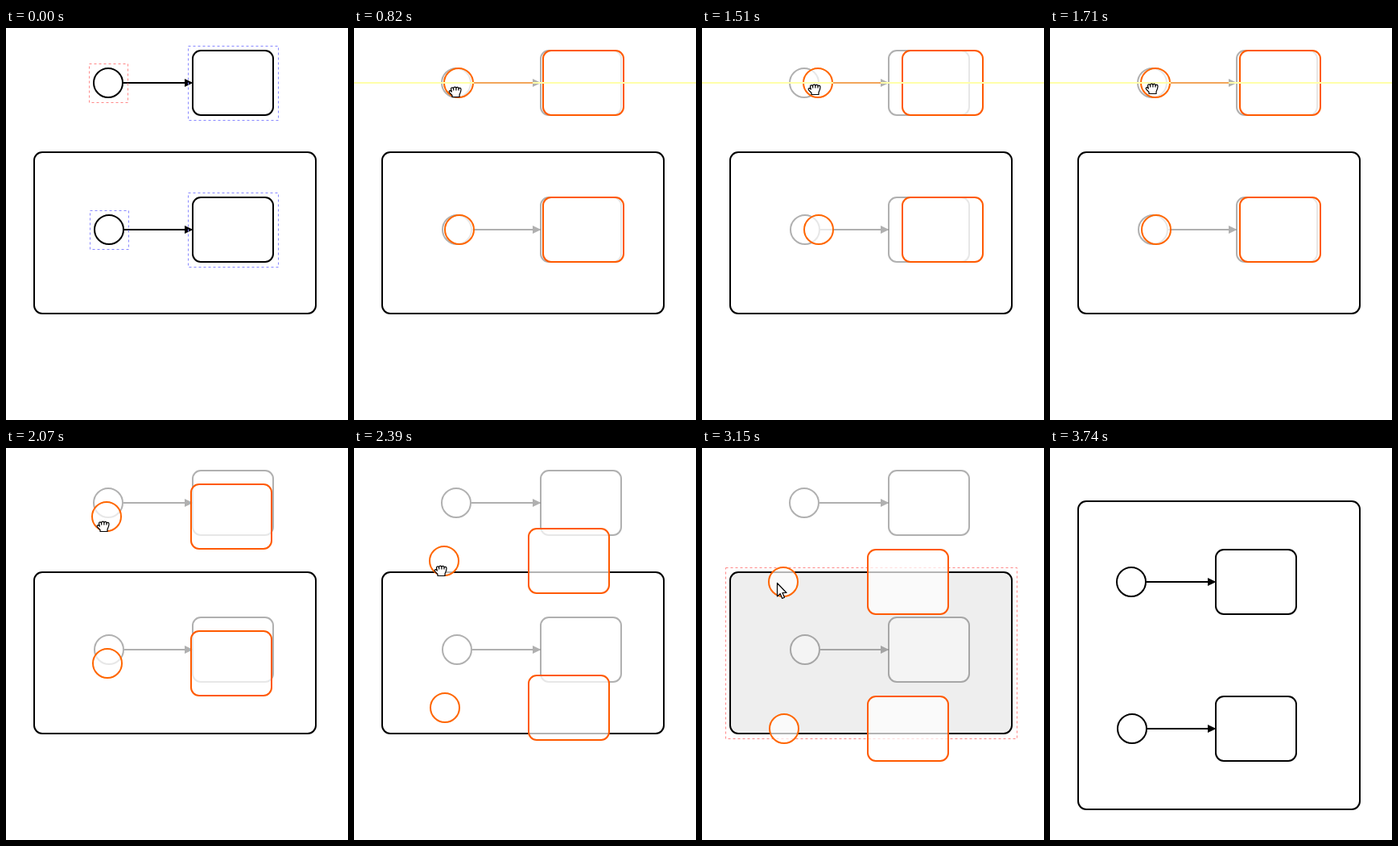
These frames come from a looping animation (425x486 px, 4.82 s). An HTML page with a canvas:

```html
<!DOCTYPE html>
<html lang="en">
<head>
<meta charset="utf-8">
<title>Dragging shapes into a container</title>
<style>
  html, body { margin: 0; width: 100%; height: 100%; overflow: hidden; background: #fff; }
  canvas { display: block; }
</style>
</head>
<body>
<canvas id="stage" width="425" height="486"></canvas>
<script>
const ctx = document.getElementById('stage').getContext('2d');
const LOOP = 4820, STEP = 40, SNAP = 7;
const DRAG = 820, BACK = 1390, ENTER = 2430, RELEASE = 3150, DROP = 3190, LEAVE = 3480, DESELECT = 3740;
const BLUE = '#8888ff', RED = '#ff8888', ORANGE = '#ff5a00';

// Pointer offset from the grab point: [time, x, y]
const pointer = [
  [780, 0, -1], [1100, 27, -4], [1350, 27, -4], [1710, 4, -5], [1870, 2, -5],
  [1910, 2, -5], [2070, -2, 17], [2390, -15, 72], [2470, -19, 82], [2670, -26, 98]
];
const exitPath = [[3190, 93, 167], [3470, 402, 300]];

const circles = [[127, 68], [128, 250]];
const boxes = [[232, 28], [232, 210]];

const hand = new Path2D('M-3.5 6.5V4.5L-7 .8C-8-.8-6.5-2-5-.8L-4.2 0-5-3.5C-5-5.5-2.6-5.6-2-4C-1.8-6.5 1.2-6.5 1.4-4.5C2-6.3 4.4-6 4.5-4C5.2-5.2 7.5-4.8 7.5-2.8C7.5 0 6.5 2 5.5 4V6.5Z');
const fingers = new Path2D('M-1.8-4V-1.5M1.4-4.5V-1.5M4.5-4V-1.5');
const arrow = new Path2D('M.5 .5V17L4.2 13.6 6.7 19.5 9.5 18.2 7 12.5H12Z');

function along(path, t) {
  if (t <= path[0][0]) return path[0].slice(1);
  for (let i = 1; i < path.length; i++) {
    const [t0, x0, y0] = path[i - 1], [t1, x1, y1] = path[i];
    if (t < t1) {
      const k = (t - t0) / (t1 - t0);
      return [Math.round(x0 + (x1 - x0) * k), Math.round(y0 + (y1 - y0) * k)];
    }
  }
  return path[path.length - 1].slice(1);
}

function paint(fill, stroke, fillAlpha = 1) {
  const alpha = ctx.globalAlpha;
  ctx.globalAlpha = alpha * fillAlpha;
  ctx.fillStyle = fill;
  ctx.fill();
  ctx.globalAlpha = alpha;
  ctx.strokeStyle = stroke;
  ctx.lineWidth = 2;
  ctx.stroke();
}

function circle(x, y, ...style) {
  ctx.beginPath();
  ctx.arc(x, y, 18, 0, Math.PI * 2);
  paint(...style);
}

function box(x, y, w, h, ...style) {
  ctx.beginPath();
  ctx.roundRect(x, y, w, h, 10);
  paint(...style);
}

function outline(x, y, w, h, color) {
  ctx.save();
  ctx.setLineDash([3, 3]);
  ctx.strokeStyle = color;
  ctx.lineWidth = 1;
  ctx.strokeRect(x - 5.5, y - 5.5, w + 12, h + 12);
  ctx.restore();
}

function flow(x0, x1, y) {
  ctx.fillStyle = '#000';
  ctx.fillRect(x0, y - 1, x1 - 10 - x0, 2);
  ctx.beginPath();
  ctx.moveTo(x1 - 10, y - 5);
  ctx.lineTo(x1 + .5, y);
  ctx.lineTo(x1 - 10, y + 5);
  ctx.fill();
}

function shapes(dx, dy, alpha) {
  ctx.globalAlpha = alpha;
  circles.forEach(([cx, cy], i) => {
    const [bx, by] = boxes[i];
    flow(cx + dx + 19, bx + dx, cy + dy);
    circle(cx + dx, cy + dy, '#fff', '#000');
    box(bx + dx, by + dy, 100, 80, '#fff', '#000');
  });
  ctx.globalAlpha = 1;
}

function ghosts(dx, dy) {
  circles.forEach(([x, y]) => circle(x + dx, y + dy, '#fff', '#ff6600', .7));
  boxes.forEach(([x, y]) => box(x + dx, y + dy, 100, 80, '#fff', ORANGE, .7));
}

function selection(dx, dy, hovered) {
  circles.forEach(([x, y], i) =>
    outline(x + dx - 18, y + dy - 18, 36, 36, hovered && !i ? RED : BLUE));
  boxes.forEach(([x, y]) => outline(x + dx, y + dy, 100, 80, BLUE));
}

function guide(dx) {
  ctx.fillStyle = '#ffffaa';
  ctx.fillRect(0, 67, 425, 2);
  const x = 146 + Math.max(0, dx);
  ctx.fillStyle = '#f2a65a';
  ctx.fillRect(x, 67, 222 - x, 2);
}

function cursor(x, y, dragging) {
  ctx.save();
  ctx.translate(x, y);
  ctx.lineJoin = 'round';
  ctx.lineWidth = 1.2;
  ctx.fillStyle = '#fff';
  ctx.strokeStyle = '#000';
  const path = dragging ? hand : arrow;
  ctx.fill(path);
  ctx.stroke(path);
  if (dragging) ctx.stroke(fingers);
  ctx.restore();
}

function drawDrag(t) {
  const [mx, my] = along(pointer, t);
  const snapped = Math.abs(my) < SNAP;
  const dy = snapped ? 0 : my;
  const over = t >= ENTER;
  box(35, 154, 350, 200, over ? '#eee' : '#fff', '#000');
  if (over) outline(35, 154, 350, 200, RED);
  shapes(0, 0, .31);
  ghosts(mx, dy);
  if (snapped) guide(mx);
  if (t < RELEASE) cursor(122.5 + mx, 80 + my, true);
  else cursor(93, 167, false);
}

function drawDropped(t, time) {
  box(35, 66, 350, 382, '#fff', '#000');
  const [x, y] = along(exitPath, t);
  const visible = time < LEAVE;
  const onCircle = visible && x < 119;
  if (visible && !onCircle && x < 385) outline(35, 66, 350, 382, RED);
  shapes(-26, 98, 1);
  if (time < DESELECT) selection(-26, 98, onCircle);
  if (visible) cursor(x, y, false);
}

function draw(time) {
  const start = time < BACK ? DRAG : BACK;
  const t = start + Math.floor((time - start) / STEP) * STEP;
  ctx.fillStyle = '#fff';
  ctx.fillRect(0, 0, 425, 486);
  if (time < DRAG) {
    box(35, 154, 350, 200, '#fff', '#000');
    shapes(0, 0, 1);
    selection(0, 0, true);
  } else if (time < DROP) {
    drawDrag(t);
  } else {
    drawDropped(t, time);
  }
}

const begin = performance.now();
function tick() {
  draw((performance.now() - begin) % LOOP);
  requestAnimationFrame(tick);
}
tick();
</script>
</body>
</html>
```
